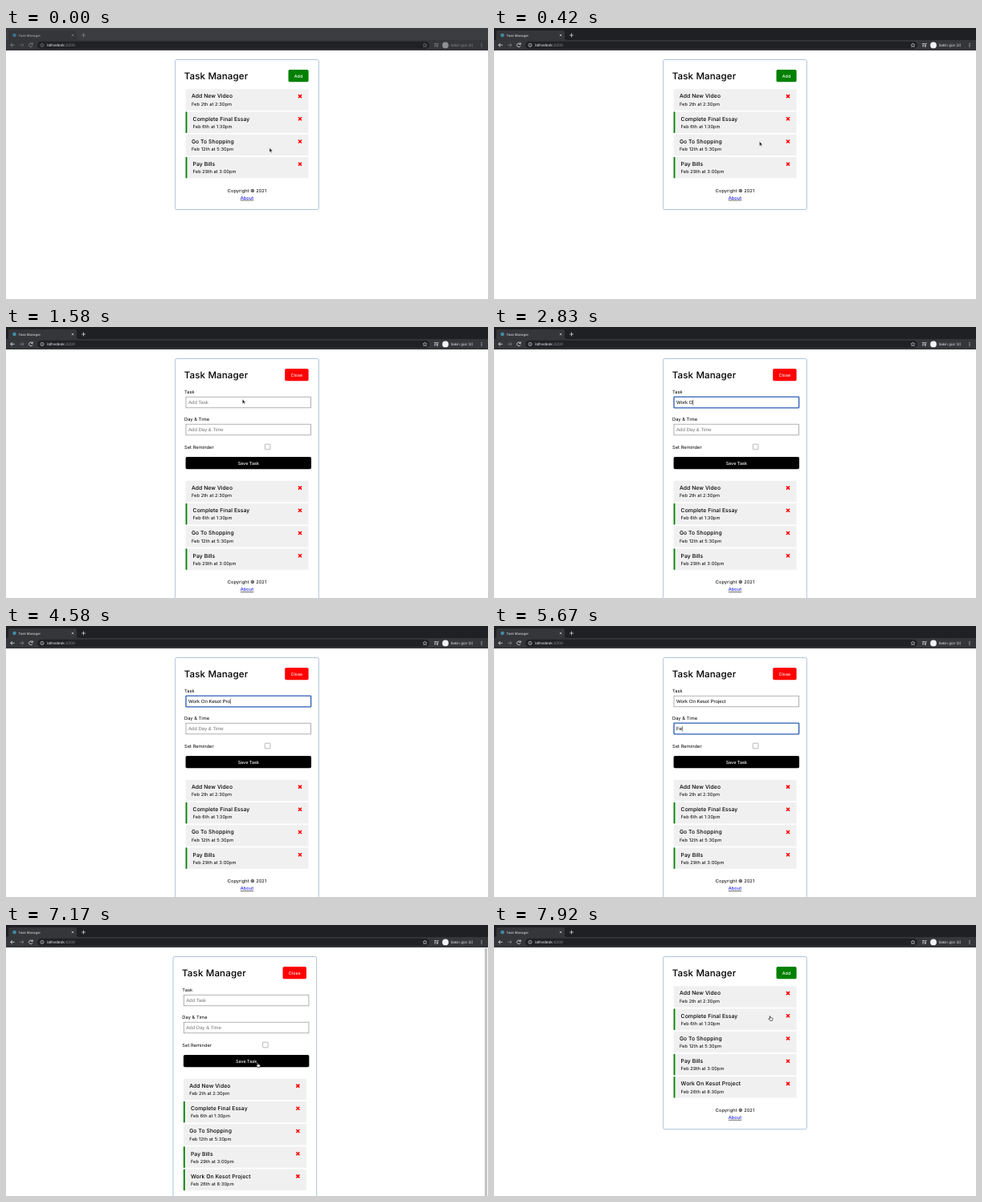
These frames come from a looping animation (600x338 px, 8 s). An HTML page:

```html
<!DOCTYPE html>
<html lang="en">
<head>
<meta charset="utf-8">
<title>Task Manager</title>
<style>
  html, body { margin: 0; width: 100%; height: 100%; overflow: hidden; background: #fff; }
  svg { display: block; width: 100vw; height: 100vh; }
  text { font: 5.7px Inter, "Open Sans", sans-serif; letter-spacing: .01em; text-rendering: geometricPrecision; }
  .h1 { font-size: 11.6px; font-weight: 500; }
  .h3 { font-size: 6.8px; font-weight: 500; }
  .btn { font-size: 5.34px; font-weight: 500; }
  .mid { text-anchor: middle; }
  .field { font: 6.05px "Liberation Sans", Arial, sans-serif; letter-spacing: 0; }
  .tab { font-size: 4.15px; letter-spacing: 0; }
  .url { font-size: 4.75px; letter-spacing: 0; }
  .user { font-size: 4.45px; letter-spacing: 0; }
</style>
</head>
<body>
<svg id="stage" viewBox="0 0 600 338"></svg>
<script>
const LOOP = 8000, PITCH = 28.2;
const WAKE = 250, OPEN = 1250, FOCUS = 1660, DAY = 5500, CHECK = 6600, SAVE = 7000, CLOSE = 7670;

const task = 'Work On Kesot Project', day = 'Feb 26th at 8:30pm';
const keys = [1830, 2000, 2170, 2330, 2750, 2830, 3000, 3170, 3330, 3500, 3670,
  3830, 4000, 4170, 4330, 4420, 4580, 4750, 4830, 5000, 5170];
const rows = [
  ['Add New Video', 'Feb 2th at 2:30pm', false],
  ['Complete Final Essay', 'Feb 6th at 1:30pm', true],
  ['Go To Shopping', 'Feb 12th at 5:30pm', false],
  ['Pay Bills', 'Feb 29th at 3:00pm', true],
  [task, day, true]
];

// Pointer stops: time, x, y, shape from that time on
const stops = [
  [0, 328, 149.5, 'arrow'], [300, 328, 149.5, 'arrow'], [950, 354, 62, 'hand'],
  [1330, 354, 62, 'arrow'], [1640, 288, 93, 'beam'], [1830, 288, 93, ''],
  [5250, 288, 93, 'beam'], [5470, 290, 128, 'beam'], [5580, 290, 128, ''],
  [6380, 290, 128, 'arrow'], [6580, 327.5, 147.5, 'arrow'], [6720, 327.5, 147.5, 'arrow'],
  [6930, 312, 171.5, 'hand'], [7250, 312, 171.5, 'arrow'], [7570, 358, 61, 'hand'],
  [7755, 358, 61, 'arrow'], [7830, 308, 236, 'hand'], [7910, 342.5, 113.5, 'hand'],
  [LOOP, 342.5, 113.5, 'hand']
];
const shapes = {
  arrow: '<path d="M0 0V5.6L1.3 4.4 2.2 6.3 3.1 5.9 2.2 4.1H4Z" fill="#111" stroke="#fff" stroke-width=".5"/>',
  hand: '<path d="M.6 .3Q1.3-.2 1.6.7L1.9 2.2 4 2.7Q4.6 3 4.4 4L3.9 5.8H1.2L-.7 3.6Q-.7 2.8.3 3.2L.9 3.7Z" fill="#fff" stroke="#111" stroke-width=".65"/>',
  beam: '<path d="M-1-2.6Q0-2.6 0-2Q0-2.6 1-2.6M0-2V2M-1 2.6Q0 2.6 0 2Q0 2.6 1 2.6" fill="none" stroke="#222" stroke-width=".6"/>'
};

const pen = document.createElement('canvas').getContext('2d');
pen.font = '60.5px "Liberation Sans", Arial, sans-serif';

const rect = (x, y, w, h, fill, r = 0, more = '') =>
  `<rect x="${x}" y="${y}" width="${w}" height="${h}" rx="${r}" fill="${fill}" ${more}/>`;
const text = (x, y, s, cls = '', fill = '#000') =>
  `<text x="${x}" y="${y}" class="${cls}" fill="${fill}">${s.replace('&', '&amp;')}</text>`;
const line = (d, color, w = .8) =>
  `<path d="${d}" fill="none" stroke="${color}" stroke-width="${w}"/>`;
const disc = (x, y, r, fill) => `<circle cx="${x}" cy="${y}" r="${r}" fill="${fill}"/>`;
const button = (x, y, w, fill, label) =>
  rect(x, y, w, 15.2, fill, 1.8) + text(x + w / 2, y + 9.5, label, 'btn mid', '#fff');

function browser(awake) {
  const ink = awake ? '#e8eaed' : '#898b8e', faint = awake ? '#85878a' : '#66686b';
  return rect(0, 0, 600, 28, '#35363a') +
    rect(0, 0, 600, 15, awake ? '#1f2024' : '#3b3d40') +
    `<path d="M1 15Q3 15 3 13V5Q3 3 5 3H86Q88 3 88 5V13Q88 15 90 15Z" fill="#35363a"/>` +
    disc(10.5, 9, 2.3, awake ? '#3f8ea6' : '#397488') +
    text(15.5, 10.5, 'Task Manager', 'tab', awake ? '#e0e2e5' : '#b0b2b5') +
    line('M81.7 7.7L84.3 10.3M84.3 7.7L81.7 10.3', ink, .6) +
    line('M94 9H99M96.5 6.5V11.5', ink, .7) +
    line('M10.7 21.3H5.7M8 19L5.7 21.3 8 23.6', ink) +
    line('M17 21.3H22M19.7 19L22 21.3 19.7 23.6', faint) +
    line('M32.8 20A2.3 2.3 0 1 0 33 22.2M33.2 18.4V20.4H31.2', ink) +
    rect(39, 16.8, 488, 9.2, '#202124', 4.6) +
    `<circle cx="45" cy="21.4" r="2.1" fill="none" stroke="${ink}" stroke-width=".6"/>` +
    line('M45 20.1V20.6M45 21.1V22.6', ink, .6) +
    text(51, 23.1, 'lathedesk<tspan fill="#8f9194">:4200</tspan>', 'url', '#eceef0') +
    `<path d="M521.5 18.9L522.3 20.6 524 20.8 522.7 22 523.1 23.8 521.5 22.9 519.9 23.8 520.3 22 519 20.8 520.7 20.6Z" fill="none" stroke="${ink}" stroke-width=".55"/>` +
    line('M533 19.5H536.5M533 21.2H536.5M533 22.9H535M537.3 23V19.5H538.6', ink, .7) +
    disc(536.7, 23, .8, ink) +
    disc(547, 21.4, 3.9, awake ? '#f1f3f4' : '#8e9093') +
    text(553.5, 23, 'Sakin gün (2)', 'user', ink) +
    [19.5, 21.4, 23.3].map(y => disc(592, y, .55, ink)).join('');
}

function field(y, value, hint, focused) {
  const box = focused
    ? rect(224, y, 155.6, 13.6, '#fff', .5, 'stroke="#2a5bb5" stroke-width="1.3"')
    : rect(224, y, 155.6, 13.6, '#fff', 0, 'stroke="#909090" stroke-width=".7"');
  const x = 227 + pen.measureText(value).width / 10 + .3;
  return box + text(227, y + 8.8, value || hint, 'field', value ? '#000' : '#757575') +
    (focused ? line(`M${x} ${y + 3.6}v6.6`, '#000', .55) : '');
}

function form(t) {
  const saved = t >= SAVE, checked = t >= CHECK && !saved;
  const typed = saved ? 0 : keys.filter(k => k <= t).length;
  const typedDay = saved ? 0 : Math.max(0, Math.floor((t - DAY - 80) / 41));
  return text(222, 82.6, 'Task') +
    field(87.2, task.slice(0, typed), 'Add Task', t >= FOCUS && t < DAY) +
    text(222, 116.6, 'Day & Time') +
    field(121.2, day.slice(0, typedDay), 'Add Day & Time', t >= DAY && t < CHECK - 20) +
    text(222, 151.6, 'Set Reminder') +
    (checked
      ? rect(322, 146, 7, 7, '#1c62d1', 1, 'stroke="#274f9c" stroke-width=".8"') +
        line('M323.4 149.6L325 151.2 327.8 147.7', '#fff', 1)
      : rect(322.3, 146.2, 6.6, 6.6, '#fff', .9, 'stroke="#858585" stroke-width=".6"')) +
    button(223.6, 162, 156.4, '#000', 'Save Task');
}

function row([name, when, reminder], y) {
  const x = reminder ? 232.6 : 230.9;
  return rect(223.6, y, 153, 26.4, '#f1f0f1') +
    (reminder ? rect(223.6, y, 1.8, 26.4, '#008000') : '') +
    text(x, y + 11.1, name, 'h3') + text(x, y + 20.4, when) +
    line(`M364 ${y + 6.8}l4 4m0-4l-4 4`, '#f00', 1.5);
}

function card(t) {
  const open = t >= OPEN && t < CLOSE;
  const list = rows.slice(0, t >= SAVE ? 5 : 4);
  const top = open ? 191.8 : 76.3, end = top + list.length * PITCH;
  const scroll = open && t >= SAVE;
  return `<g transform="translate(${scroll ? -2.67 : 0})">` +
    rect(210.7, 39.5, 178.6, end + 37.4 - 39.5, '#fff', 1.8, 'stroke="#a5bed4" stroke-width=".9"') +
    text(221.7, 64, 'Task Manager', 'h1') +
    (open ? button(347.2, 52, 29.4, '#f00', 'Close') + form(t) : button(351.5, 52, 25.1, '#008000', 'Add')) +
    list.map((r, i) => row(r, top + i * PITCH)).join('') +
    text(300, end + 15.5, 'Copyright © 2021', 'mid') +
    `<g text-decoration="underline">${text(300, end + 24.6, 'About', 'mid', '#0000ee')}</g></g>` +
    (scroll ? rect(594.7, 28, 5.3, 310, '#fafafa') + rect(596, 28.8, 2.9, 320, '#c1c1c1', 1.4) : '');
}

function pointer(t) {
  const i = stops.findIndex(s => s[0] > t);
  const [t0, x0, y0, kind] = stops[i - 1], [t1, x1, y1] = stops[i];
  if (!kind) return '';
  const u = (t - t0) / (t1 - t0), e = u * u * (3 - 2 * u);
  return `<g transform="translate(${x0 + (x1 - x0) * e} ${y0 + (y1 - y0) * e})">${shapes[kind]}</g>`;
}

const stage = document.getElementById('stage');
let shown = '';
function draw() {
  const t = performance.now() % LOOP;
  const scene = card(t) + browser(t >= WAKE) + pointer(t);
  if (scene !== shown) stage.innerHTML = shown = scene;
  requestAnimationFrame(draw);
}
draw();
</script>
</body>
</html>
```
